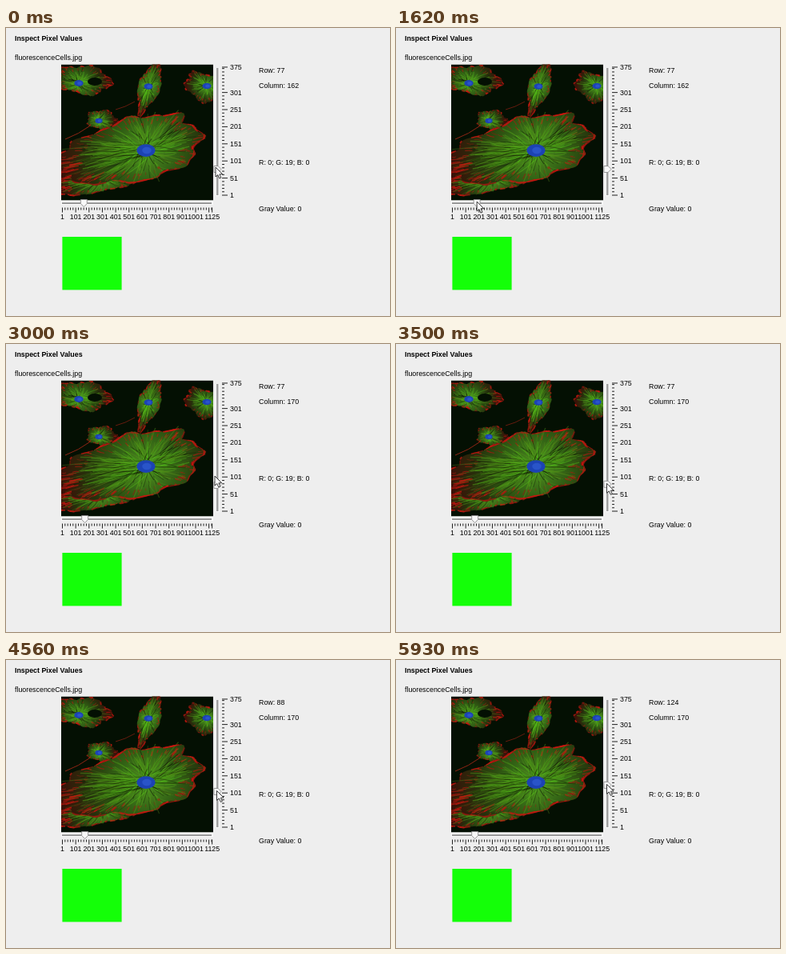
Write an HTML page with a canvas that moves like this. It is 480 px wide and 360 px high and loops after 6000 ms.

```html
<!DOCTYPE html>
<html lang="en">
<head>
<meta charset="utf-8">
<title>Inspect Pixel Values</title>
<style>
html, body { margin: 0; width: 100%; height: 100%; overflow: hidden; background: #eee; }
canvas { display: block; width: 480px; height: 360px; }
</style>
</head>
<body>
<canvas id="stage" width="480" height="360"></canvas>
<script>
const LOOP = 6000, STEP = 62.5, TAU = Math.PI * 2;
const ctx = document.getElementById('stage').getContext('2d');
const PHOTO = { x: 69, y: 45.5, w: 190, h: 170 };

// x, y: body centre; nx, ny, nr: nucleus; egg: widening towards one end
const cells = [
  { x: 97, y: 65, rx: 36, ry: 19, tilt: 0.1, egg: 0, arms: 5, nx: 91, ny: 69, nr: 5.2 },
  { x: 178, y: 77, rx: 35, ry: 13, tilt: -1.25, egg: 0.35, arms: 4, nx: 178, ny: 73, nr: 5 },
  { x: 247, y: 74, rx: 26, ry: 18, tilt: 0.5, egg: 0, arms: 5, nx: 251, ny: 72.5, nr: 5 },
  { x: 120, y: 115, rx: 20, ry: 13, tilt: 0.1, egg: 0, arms: 5, nx: 116, ny: 116, nr: 4.2 },
  { x: 105, y: 194, rx: 52, ry: 14, tilt: -0.05, egg: 0, arms: 3, nx: 121, ny: 187, nr: 4.4 },
  { x: 145, y: 156, rx: 106, ry: 40, tilt: -0.23, egg: 0.32, arms: 9, nx: 175, ny: 153, nr: 10.5 }
];

function random(seed) {
  return () => (seed = (seed * 16807) % 2147483647) / 2147483647;
}

// point on a lobed, tilted egg; u runs once around
function rim(c, u) {
  const a = u * TAU;
  const lobe = 0.93 + (0.5 / c.arms) * Math.cos(c.arms * a) + 0.04 * Math.sin(a * 17);
  const px = c.rx * lobe * Math.cos(a);
  const py = c.ry * lobe * Math.sin(a) * (1 + c.egg * Math.cos(a));
  const cos = Math.cos(c.tilt), sin = Math.sin(c.tilt);
  return [c.x + px * cos - py * sin, c.y + px * sin + py * cos];
}

function strand(g, x1, y1, x2, y2, bend, color, width) {
  g.strokeStyle = color;
  g.lineWidth = width;
  g.beginPath();
  g.moveTo(x1, y1);
  g.quadraticCurveTo((x1 + x2) / 2, (y1 + y2) / 2 + bend, x2, y2);
  g.stroke();
}

function disc(g, x, y, rx, ry, color) {
  g.fillStyle = color;
  g.beginPath();
  g.ellipse(x, y, rx, ry, 0, 0, TAU);
  g.fill();
}

function drawCell(g, c, rnd) {
  const { nx, ny } = c, count = c.rx * 3;
  const glow = g.createRadialGradient(nx, ny, 2, nx, ny, c.rx);
  glow.addColorStop(0, '#4c8f20');
  glow.addColorStop(0.35, '#315f14');
  glow.addColorStop(0.7, '#26300c');
  glow.addColorStop(1, '#3a1208');
  g.fillStyle = glow;
  g.beginPath();
  for (let u = 0; u < 1; u += 0.005) g.lineTo(...rim(c, u));
  g.fill();

  // fibres gathered in bundles, fading outwards
  const bundles = 11 + Math.round(c.rx / 10);
  for (let i = 0; i < count; i++) {
    const u = (Math.floor(rnd() * bundles) + rnd() * 0.6) / bundles;
    const [ex, ey] = rim(c, u);
    const dx = ex - nx, dy = ey - ny, jx = (rnd() - 0.5) * c.nr, jy = (rnd() - 0.5) * c.nr * 1.4;
    const a = rnd() * 0.4, b = Math.min(0.95, a + 0.25 + rnd() * 0.4);
    const tone = Math.round(225 - a * 150 - rnd() * 60);
    const color = rnd() < 0.8 ? `rgba(85,${tone},25,.42)` : 'rgba(15,22,4,.5)';
    strand(g, nx + jx + dx * a, ny + jy + dy * a, nx + jx * 0.5 + dx * b, ny + jy + dy * b,
      jy * 0.4, color, 0.5 + rnd() * 0.9);
  }

  // red fringe: pieces along the rim and streaks running inwards
  for (let i = 0; i < count * 0.8; i++) {
    const u = rnd(), [x, y] = rim(c, u);
    const color = `rgba(${150 + Math.round(rnd() * 75)},24,16,.65)`;
    if (rnd() < 0.5) {
      const [x2, y2] = rim(c, u + 0.006 + rnd() * 0.02);
      strand(g, x, y, x2, y2, rnd() * 2 - 1, color, 0.8 + rnd() * 1.2);
    } else {
      const f = rnd() * 0.2, len = f + 0.04 + rnd() * 0.12;
      strand(g, x + (nx - x) * f, y + (ny - y) * f, x + (nx - x) * len, y + (ny - y) * len,
        rnd() * 3 - 1.5, color, 0.5 + rnd());
    }
  }
  disc(g, nx, ny, c.nr * 1.1, c.nr * 0.75, '#1c43b4');
  disc(g, nx + 1, ny, c.nr * 0.55, c.nr * 0.4, 'rgba(50,95,215,.6)');
}

function makePhoto() {
  const c = document.createElement('canvas');
  c.width = 480;
  c.height = 360;
  const g = c.getContext('2d'), rnd = random(4127);
  g.beginPath();
  g.rect(PHOTO.x, PHOTO.y, PHOTO.w, PHOTO.h);
  g.clip();
  g.fillStyle = '#041003';
  g.fillRect(PHOTO.x, PHOTO.y, PHOTO.w, PHOTO.h);
  strand(g, 107, 121, 74, 139, 3, '#8e2414', 1);
  strand(g, 137, 102, 161, 92, 2, '#701c10', 0.9);
  cells.forEach(cell => drawCell(g, cell, rnd));
  disc(g, 111, 67, 9, 5, '#041003');
  return c;
}

const photo = makePhoto();
const colX = c => 70.5 + (c - 1) * 0.1665;
const rowY = r => 209 - (r - 1) * 0.428;

function label(str, x, y, align = 'left', weight = 'normal') {
  ctx.font = `${weight} 8.85px "Liberation Sans", Arial, sans-serif`;
  ctx.textAlign = align;
  ctx.fillStyle = '#000';
  ctx.fillText(str, x, y);
}

function rect(x, y, w, h, color) {
  ctx.fillStyle = color;
  ctx.fillRect(x, y, w, h);
}

function drawAxes() {
  rect(69, 216, 190, 5, '#fafafa');
  rect(70, 218, 187, 2, '#989898');
  rect(262, 50, 5, 160, '#f8f8f8');
  rect(263, 50, 2.5, 159, '#a0a0a0');

  const tickX = (c, big) => rect(colX(c) - 0.5, 224.5, 1, big ? 6 : 3, '#222');
  const tickY = (r, big) => rect(270, rowY(r) - 0.5, big ? 7 : 3, 1, '#222');
  for (let c = 1; c < 1125; c += 20) tickX(c, c % 100 === 1);
  for (let r = 1; r < 375; r += 10) tickY(r, r % 50 === 1 && r < 350);
  tickX(1125, true);
  tickY(375, true);

  for (let c = 1; c <= 1001; c += 100) label(c, colX(c), 238.5, 'center');
  for (let r = 1; r <= 301; r += 50) label(r, 280, rowY(r) + 3);
  label(1125, colX(1125), 238.5, 'center');
  label(375, 280, rowY(375) + 3);
}

function shape(x, y, turn, points, fill, line) {
  ctx.save();
  ctx.translate(x, y);
  ctx.rotate(turn);
  ctx.beginPath();
  points.forEach(p => ctx.lineTo(...p));
  ctx.closePath();
  ctx.fillStyle = fill;
  ctx.fill();
  ctx.strokeStyle = line;
  ctx.lineWidth = 0.9;
  ctx.stroke();
  ctx.restore();
}

const THUMB = [[-4, -4], [4, -4], [4, 1], [0, 5], [-4, 1]];
const ARROW = [[0, 0], [0, 12], [2.8, 9.5], [4.8, 14], [6.8, 13.2], [4.9, 8.8], [8.6, 8.7]];

// drags: [start, end, value reached]
const colDrags = [[1250, 1560, 185], [1750, 1950, 170]];
const rowDrags = [[3400, 3700, 88], [4200, 4650, 107], [5200, 5600, 124]];
const RELEASE = 130;

function ease(t, from, to) {
  const u = Math.min(1, Math.max(0, (t - from) / (to - from)));
  return u * u * (3 - 2 * u);
}

const slide = (first, drags, t) =>
  drags.reduce((v, [from, to, value]) => v + (value - v) * ease(t, from, to), first);

function shownRow(t) {
  const done = rowDrags.filter(d => t >= d[1] + RELEASE);
  return done.length ? done[done.length - 1][2] : 77;
}

function pointerAt(t, thumbX, thumbY) {
  const moves = [
    [60, 600, 104, 221],
    [800, 1060, thumbX, 217],
    [2200, 2850, 261, 165],
    [3060, 3250, 263.5, thumbY - 1]
  ];
  return moves.reduce(([x, y], [from, to, tx, ty]) => {
    const k = ease(t, from, to);
    return [x + (tx - x) * k, y + (ty - y) * k];
  }, [262, 174]);
}

function draw(t) {
  const row = shownRow(t), pale = row === 107;
  const thumbX = colX(slide(162, colDrags, t)), thumbY = rowY(slide(77, rowDrags, t));

  rect(0, 0, 480, 360, '#eeeeee');
  label('Inspect Pixel Values', 11, 16, 'left', 'bold');
  label('fluorescenceCells.jpg', 11, 40);
  ctx.drawImage(photo, 0, 0);
  drawAxes();
  shape(thumbX, 218.5, 0, THUMB, '#f8f8f8', '#8c8c8c');
  shape(264, thumbY, -Math.PI / 2, THUMB, '#f8f8f8', '#8c8c8c');

  label('Row: ' + row, 316, 55.5);
  label('Column: ' + (t < 1950 + RELEASE ? 162 : 170), 316, 75);
  label(pale ? 'R: 4; G: 16; B: 6' : 'R: 0; G: 19; B: 0', 316, 171);
  label('Gray Value: ' + (pale ? 4 : 0), 316, 228.5);

  rect(70.4, 261, 74.2, 66.4, pale ? '#fcfcfc' : '#14ff08');
  shape(...pointerAt(t, thumbX, thumbY), 0, ARROW, '#fff', '#222');
}

const start = performance.now();
function frame() {
  const t = (performance.now() - start) % LOOP;
  const step = Math.ceil((Math.floor(t / 10) * 10 + 10) / STEP) - 1;
  draw(step * STEP);
  requestAnimationFrame(frame);
}
frame();
</script>
</body>
</html>
```
